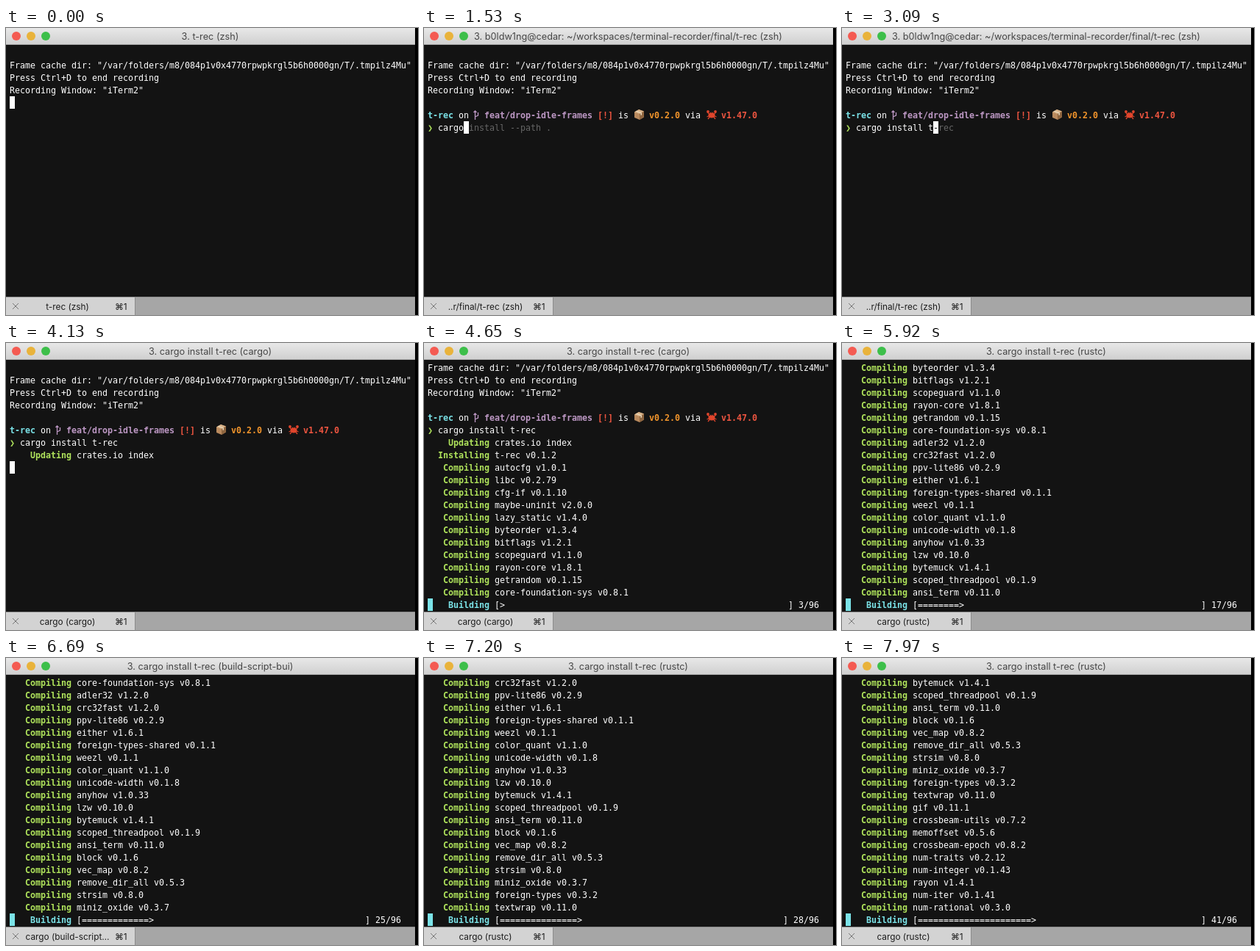
Write an HTML page that moves like this. It is 560 px wide and 391 px high and loops after 8000 ms.

```html
<!DOCTYPE html>
<html lang="en">
<head>
<meta charset="utf-8">
<title>Terminal</title>
<style>
html, body { margin: 0; width: 100%; height: 100%; overflow: hidden; background: #000; }
svg { display: block; }
text { white-space: pre; }
.term text { font: 11.63px "DejaVu Sans Mono", monospace; }
.term .b { font-weight: bold; }
.ui { font-family: Inter, "DejaVu Sans", sans-serif; }
</style>
</head>
<body>
<svg width="560" height="391" viewBox="0 0 560 391">
  <defs>
    <linearGradient id="bar" x2="0" y2="1">
      <stop stop-color="#e8e8e8"/><stop offset="1" stop-color="#d0d0d0"/>
    </linearGradient>
    <g id="box">
      <path d="M0 3.5 6 0l7 2.5v8L7 14 0 11z" fill="#b98a5e"/>
      <path d="M0 3.5 6 0l7 2.5L7 6z" fill="#d9b48a"/>
      <path d="M7 6l6-3.500v8L7 14z" fill="#8f6640"/>
      <path d="M3 1.800l7 2.700v3L8.500 8V5.200L1.700 2.600z" fill="#ead9bd"/>
    </g>
    <g id="crab" fill="#e0452c">
      <ellipse cx="7" cy="8" rx="4.600" ry="3.400"/>
      <path d="M3 6 1.500 3M11 6l1.500-3M3 9 .5 10M11 9l2.500 1M4 10.500 2 13M10 10.500 12 13M5.500 5V3M8.500 5V3" fill="none" stroke="#e0452c" stroke-width="1.300"/>
      <circle cx="2" cy="3" r="1.900"/><circle cx="12" cy="3" r="1.900"/>
      <circle cx="5.500" cy="3.500" r=".8" fill="#222"/><circle cx="8.500" cy="3.500" r=".8" fill="#222"/>
    </g>
  </defs>
  <rect width="556" height="391" fill="#131313"/>
  <g class="term" id="term"></g>
  <g class="ui">
    <rect width="556" height="22" fill="url(#bar)"/>
    <rect y="22" width="556" height="1" fill="#a8a8a8"/>
    <circle cx="14" cy="11" r="6" fill="#f45b52"/>
    <circle cx="34" cy="11" r="6" fill="#e9b33b"/>
    <circle cx="54" cy="11" r="6" fill="#3dbf4a"/>
    <text id="title" x="277.5" y="16" font-size="12.7" text-anchor="middle" fill="#464646"/>
    <rect y="367" width="556" height="24" fill="#a6a6a6"/>
    <rect y="367" width="175" height="24" fill="#d3d3d3"/>
    <rect y="366" width="556" height="1" fill="#888"/>
    <rect x="175" y="367" width="1" height="24" fill="#8c8c8c"/>
    <path d="M9 375l8 8m0-8l-8 8" stroke="#777" fill="none"/>
    <text id="tab" x="83.5" y="384" font-size="11.8" text-anchor="middle" fill="#1c1c1c"/>
    <text x="148" y="384" font-size="11.8" fill="#1c1c1c">⌘1</text>
  </g>
</svg>
<script>
const LOOP = 8000, CELL = 7, ROW = 17, ROWS = 20;
const C = {
  white: '#fff', dim: '#666', cyan: '#7be3e8', green: '#b0e45c',
  mauve: '#bd98c4', red: '#ee5540', orange: '#f2952c', dark: '#131313'
};
const COMMAND = 'cargo install t-rec';
const HINT = 'cargo install --path .';

const crates = `autocfg 1.0.1,libc 0.2.79,cfg-if 0.1.10,maybe-uninit 2.0.0,lazy_static 1.4.0,
byteorder 1.3.4,bitflags 1.2.1,scopeguard 1.1.0,rayon-core 1.8.1,getrandom 0.1.15,
core-foundation-sys 0.8.1,adler32 1.2.0,crc32fast 1.2.0,ppv-lite86 0.2.9,either 1.6.1,
foreign-types-shared 0.1.1,weezl 0.1.1,color_quant 1.1.0,unicode-width 0.1.8,anyhow 1.0.33,
lzw 0.10.0,bytemuck 1.4.1,scoped_threadpool 0.1.9,ansi_term 0.11.0,block 0.1.6,vec_map 0.8.2,
remove_dir_all 0.5.3,strsim 0.8.0,miniz_oxide 0.3.7,foreign-types 0.3.2,textwrap 0.11.0,
gif 0.11.1,crossbeam-utils 0.7.2,memoffset 0.5.6,crossbeam-epoch 0.8.2,num-traits 0.2.12,
num-integer 0.1.43,rayon 1.4.1,num-iter 0.1.41,num-rational 0.3.0`
  .split(/,\s*/).map(s => s.replace(' ', ' v'));

// [start, phase, typed characters or printed lines, finished units, process]
const steps = [
  [0, 'idle'], [250, 'wait'],
  [510, 'type', 0], [770, 'type', 1], [1010, 'type', 2], [1270, 'type', 3],
  [1530, 'type', 5], [1790, 'type', 6], [2050, 'type', 8], [2310, 'type', 10],
  [2570, 'type', 12], [2830, 'type', 14], [3090, 'type', 15], [3350, 'type', 17],
  [3610, 'type', 19],
  [3870, 'run', 0], [4130, 'run', 1], [4390, 'run', 2],
  [4650, 'build', 11, 3, 'cargo'], [4910, 'build', 16, 7, 'cargo'],
  [5150, 'build', 20, 11, 'cargo'], [5410, 'build', 23, 15, 'rustc'],
  [5670, 'build', 24, 17, 'rustc'], [5930, 'build', 25, 19, 'rustc'],
  [6190, 'build', 26, 21, 'rustc'], [6430, 'build', 28, 23, 'rustc'],
  [6690, 'build', 29, 25, 'build-script-bui'], [6950, 'build', 31, 28, 'rustc'],
  [7210, 'build', 33, 31, 'rustc'], [7460, 'build', 36, 35, 'rustc'],
  [7720, 'build', 38, 38, 'rustc'], [7970, 'build', 40, 41, 'rustc']
];

const $ = id => document.getElementById(id);
const px = col => 5 + col * CELL;
const esc = s => s.replace(/&/g, '&amp;').replace(/</g, '&lt;').replace(/>/g, '&gt;');
const run = (col, s, fill = C.white, bold = false) =>
  `<text x="${px(col)}" y="13"${bold ? ' class="b"' : ''} fill="${fill}">${esc(s)}</text>`;
const cursor = (col, fill = C.white) =>
  `<rect x="${px(col)}" width="${CELL}" height="${ROW}" fill="${fill}"/>`;
const status = (verb, s) => run(12 - verb.length, verb, C.green, true) + run(13, s);

const intro = [
  '',
  run(0, 'Frame cache dir: "/var/folders/m8/084p1v0x4770rpwpkrgl5b6h0000gn/T/.tmpilz4Mu"'),
  run(0, 'Press Ctrl+D to end recording'),
  run(0, 'Recording Window: "iTerm2"')
];
const prompt = run(0, 't-rec', C.cyan, true) + run(6, 'on') +
  `<path d="M69.500 3v12M69.500 11l4-2V5M67.500 5l2-2 2 2" fill="none" stroke="${C.mauve}" stroke-width="1.300"/>` +
  run(11, 'feat/drop-idle-frames', C.mauve, true) + run(33, '[!]', C.red, true) + run(37, 'is') +
  '<use href="#box" x="286" y="1"/>' + run(43, 'v0.2.0', C.orange, true) + run(50, 'via') +
  '<use href="#crab" x="384" y="1"/>' + run(57, 'v1.47.0', C.red, true);
const arrow = run(0, '❯', C.green, true);

function typing(n) {
  const typed = COMMAND.slice(0, n);
  const full = HINT.startsWith(typed) ? HINT : COMMAND;
  const rest = n ? full.slice(n) : '';
  return arrow + run(2, typed) + cursor(2 + n) +
    run(2 + n, rest.slice(0, 1), C.dark) + run(3 + n, rest.slice(1), C.dim);
}

function building(done) {
  const tail = `] ${done}/96`;
  const width = 63 - String(done).length - 6;
  const bar = '='.repeat(Math.floor(width * done / 96) - 1) + '>';
  return cursor(0, C.cyan) + run(4, 'Building', C.cyan, true) +
    run(13, '[' + bar.padEnd(width) + tail);
}

function screen(phase, n, done) {
  if (phase === 'idle' || phase === 'wait') return [...intro, cursor(0)];
  const head = [...intro, '', prompt];
  if (phase === 'type') return [...head, typing(n)];
  head.push(arrow + run(2, COMMAND));
  const setup = [status('Updating', 'crates.io index'), status('Installing', 't-rec v0.1.2')];
  if (phase === 'run') return [...head, ...setup.slice(0, n), cursor(0)];
  const list = crates.slice(0, n).map(s => status('Compiling', s));
  return [...head, ...setup, ...list, building(done)];
}

function labels(phase, proc = 'cargo') {
  if (phase === 'idle') return ['t-rec (zsh)', 't-rec (zsh)'];
  if (phase === 'wait' || phase === 'type')
    return ['b0ldw1ng@cedar: ~/workspaces/terminal-recorder/final/t-rec (zsh)', '..r/final/t-rec (zsh)'];
  const tab = proc.length > 12 ? `cargo (${proc.slice(0, 12)}…` : `cargo (${proc})`;
  return [`cargo install t-rec (${proc})`, tab];
}

let shown;
function draw(t) {
  const step = steps.findLast(s => s[0] <= t);
  if (step === shown) return;
  shown = step;
  const [, phase, n, done, proc] = step;
  $('term').innerHTML = screen(phase, n, done).slice(-ROWS)
    .map((line, i) => `<g transform="translate(0 ${25 + i * ROW})">${line}</g>`).join('');
  const [title, tab] = labels(phase, proc);
  $('title').textContent = '3. ' + title;
  $('tab').textContent = tab;
}

const start = performance.now();
function tick() {
  draw((performance.now() - start) % LOOP);
  requestAnimationFrame(tick);
}
tick();
</script>
</body>
</html>
```
